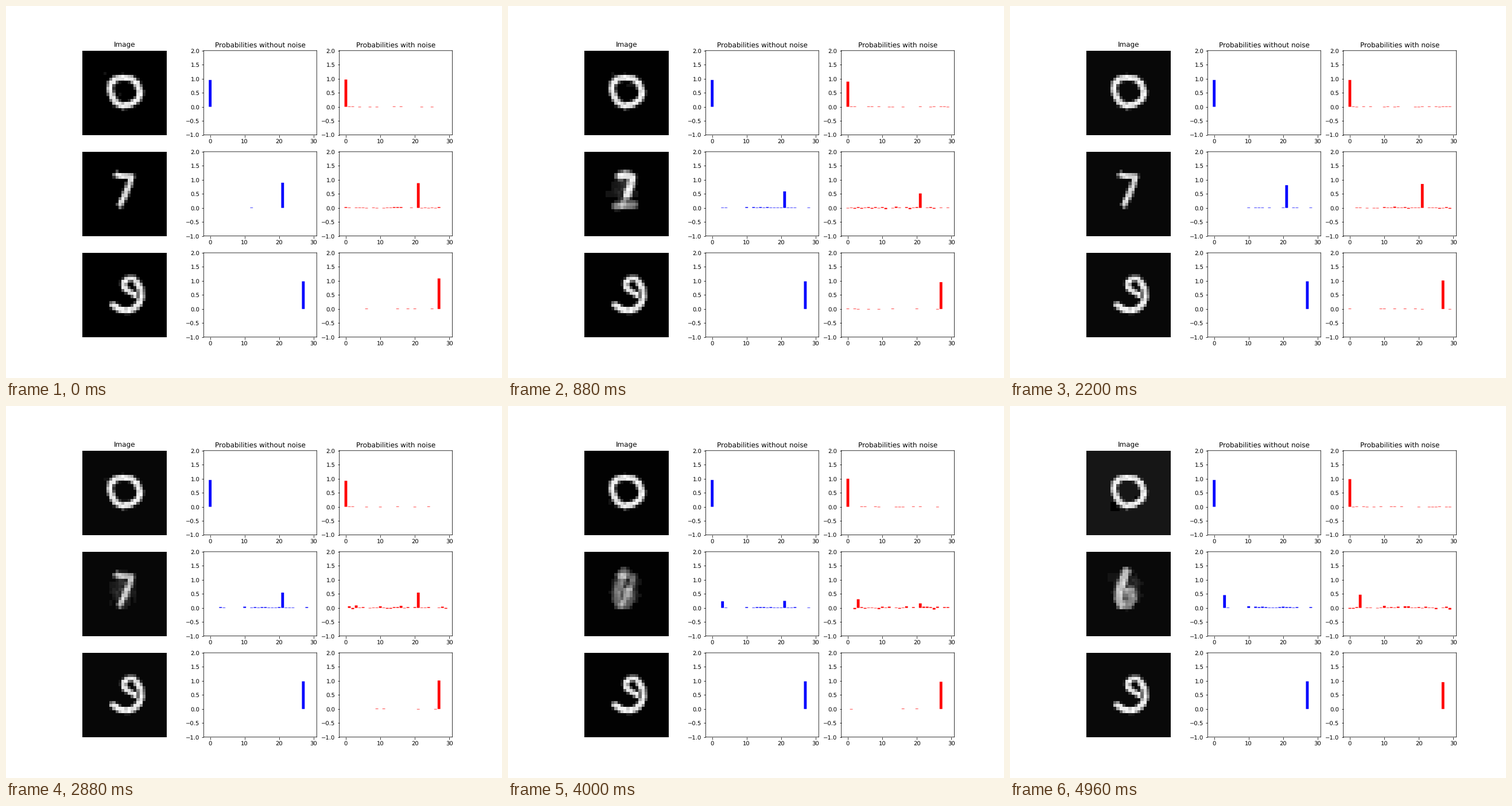
Animation, 864 px wide and 648 px high, one loop 5000 ms. Source, as a matplotlib script:

```python
import numpy as np
import matplotlib.pyplot as plt
from matplotlib.animation import FuncAnimation

STEPS, INTERVAL = 125, 40
CELLS, CODES = 28, 30
BAR_UNIT = 1 / 68  # thinnest bar that still shows
SPECK = 20

# Course of the doubtful middle row and of the empty picture's grey level.
TIMES = [0, 22, 42, 55, 89, 110, 124]
CERTAINTY = [.89, .57, .91, .8, .25, .62, .42]
GROUND = [0, 1, 4, 8, 6, 0, 9]

plt.rcParams.update({"font.family": "DejaVu Sans", "path.snap": False,
                     "text.hinting": "no_hinting"})
yy, xx = np.mgrid[:CELLS, :CELLS] + 0.5
fixed = np.random.default_rng(9)
grain = fixed.uniform(0.86, 1, (CELLS, CELLS))
mottle = fixed.uniform(0.5, 1.1, (CELLS, CELLS))

# How the doubt spreads over the other codes.
rivals = np.zeros(CODES)
rivals[[3, 4, 10, *range(12, 25), 28]] = fixed.uniform(0.5, 1.4, 17)
rivals[10] = 2
rivals /= rivals.sum()


def stroke(points, reach):
    """Soft pen line through points given in cell units."""
    dist = np.full((CELLS, CELLS), 99.0)
    for (x0, y0), (x1, y1) in zip(points, points[1:]):
        dx, dy = x1 - x0, y1 - y0
        t = np.clip(((xx - x0) * dx + (yy - y0) * dy) / (dx * dx + dy * dy), 0, 1)
        dist = np.minimum(dist, np.hypot(xx - x0 - t * dx, yy - y0 - t * dy))
    return np.clip(reach - dist, 0, 1) * grain


def ease(t):
    t = np.clip(t, 0, 1)
    return t * t * (3 - 2 * t)


ZERO = stroke([(9.1, 13), (9.5, 10.7), (11.2, 9.3), (13.5, 8.9), (16.4, 9.3),
               (18.2, 11), (19.3, 13.9), (18.4, 16.2), (16.2, 17.7),
               (13.5, 18.3), (11.2, 17.3), (10, 15.4), (9.1, 13)], 1.5)
SEVEN = stroke([(11.4, 7.6), (12.6, 8), (16.4, 8.2), (16.2, 9), (15.3, 11.7),
                (14.3, 14.1), (13.1, 16.4), (12.6, 17.6)], 1.45)
THREE = np.maximum(
    stroke([(18.3, 10.1), (17, 8.5), (15.2, 8.5), (13.7, 10), (13.9, 11.5),
            (15.6, 13), (17.7, 14)], 1.4),
    stroke([(18.3, 10.1), (19.4, 12), (19.6, 14.7), (18.9, 16.8), (17.4, 18.4),
            (15, 19.2), (12.4, 18.8), (10.2, 17.3)], 1.5))
NINE = np.maximum(
    stroke([(11.8, 8.2), (13.7, 7.4), (15.8, 8.3), (15.4, 11), (14.3, 14.2)], 1.8),
    0.8 * stroke([(10.5, 18), (13, 17.8), (16.6, 17.6)], 1.7))
SIX = np.maximum(
    stroke([(13.2, 6.6), (12.4, 8.8), (11.2, 12.2), (10.8, 15.5), (11.7, 17.6)], 1.9),
    0.65 * stroke([(11.5, 13.4), (15, 13), (15.6, 15.5), (14, 17.6), (12, 17.6)], 1.9))
FOG = np.exp(-((xx - 13.6) / 4.4) ** 2 - ((yy - 12.8) / 6) ** 2) * mottle


def doubt_glyph(step, sure):
    """The middle picture: a seven that dissolves and turns into a six."""
    ghost = 0.6 * np.exp(-((step - 22) / 8) ** 2)
    turn = ease((step - 95) / 10)
    lead = (1 - turn) * SEVEN + turn * SIX
    return ((0.4 + 0.6 * sure) * (1 - ghost) * lead + ghost * NINE
            + 0.6 * max(0, 0.95 - sure) * FOG)


def picture(row, step, sure, rng):
    ground = np.interp(step, TIMES, GROUND)
    if (row == 0 and step > 111) or sure < 0.35:
        ground = 22
    img = np.full((CELLS, CELLS), ground)
    if row < 2:
        for _ in range(rng.integers(0, 3 + row)):
            top, left = rng.integers(7, 18, 2)
            h, w = rng.integers(1, 4, 2)
            img[top:top + h, left:left + w] = SPECK if ground < 15 else 0
    glyph = doubt_glyph(step, sure) if row == 1 else (ZERO, None, THREE)[row]
    return np.where(glyph > 0.08, np.clip(glyph, 0, 1), img / 255)


def heights(row, step, sure, rng):
    """Clean and noisy bar heights of one row."""
    clean = np.zeros(CODES)
    if row == 1:
        turn = ease((step - 95) / 10)
        clean = 0.85 * (1 - sure) * rivals * rng.uniform(0.5, 1.3, CODES)
        clean[21] += sure * (1 - turn)
        clean[3] += sure * turn
    else:
        clean[0 if row == 0 else 27] = sure
    spread = (0.008, 0.011 + 0.035 * (1 - sure), 0.005)[row]
    noisy = clean + rng.normal(0, 1, CODES) * (spread + 0.03 * clean)
    return [np.round(v / BAR_UNIT) * BAR_UNIT for v in (clean, noisy)]


fig, axes = plt.subplots(3, 3, figsize=(12, 9), dpi=72)
images, blues, reds = [], [], []
for ax_img, ax_clean, ax_noisy in axes:
    images.append(ax_img.imshow(np.zeros((CELLS, CELLS)), cmap="gray", vmin=0, vmax=1))
    ax_img.axis("off")
    blues.append(ax_clean.bar(range(CODES), np.zeros(CODES), color="blue"))
    reds.append(ax_noisy.bar(range(CODES), np.zeros(CODES), color="red"))
    for ax in (ax_clean, ax_noisy):
        ax.set_ylim(-1, 2)
titles = ("Image", "Probabilities without noise", "Probabilities with noise")
for ax, title in zip(axes[0], titles):
    ax.set_title(title)


def draw(step):
    for row in range(3):
        rng = np.random.default_rng(1000 * row + step)
        sure = (0.96, np.interp(step, TIMES, CERTAINTY), 0.985)[row]
        images[row].set_data(picture(row, step, sure, rng))
        for group, values in zip((blues[row], reds[row]),
                                 heights(row, step, sure, rng)):
            for bar, h in zip(group, values):
                bar.set_height(h)
    return images


anim = FuncAnimation(fig, draw, frames=STEPS, interval=INTERVAL,
                     repeat=True, repeat_delay=0)
plt.show()
```
